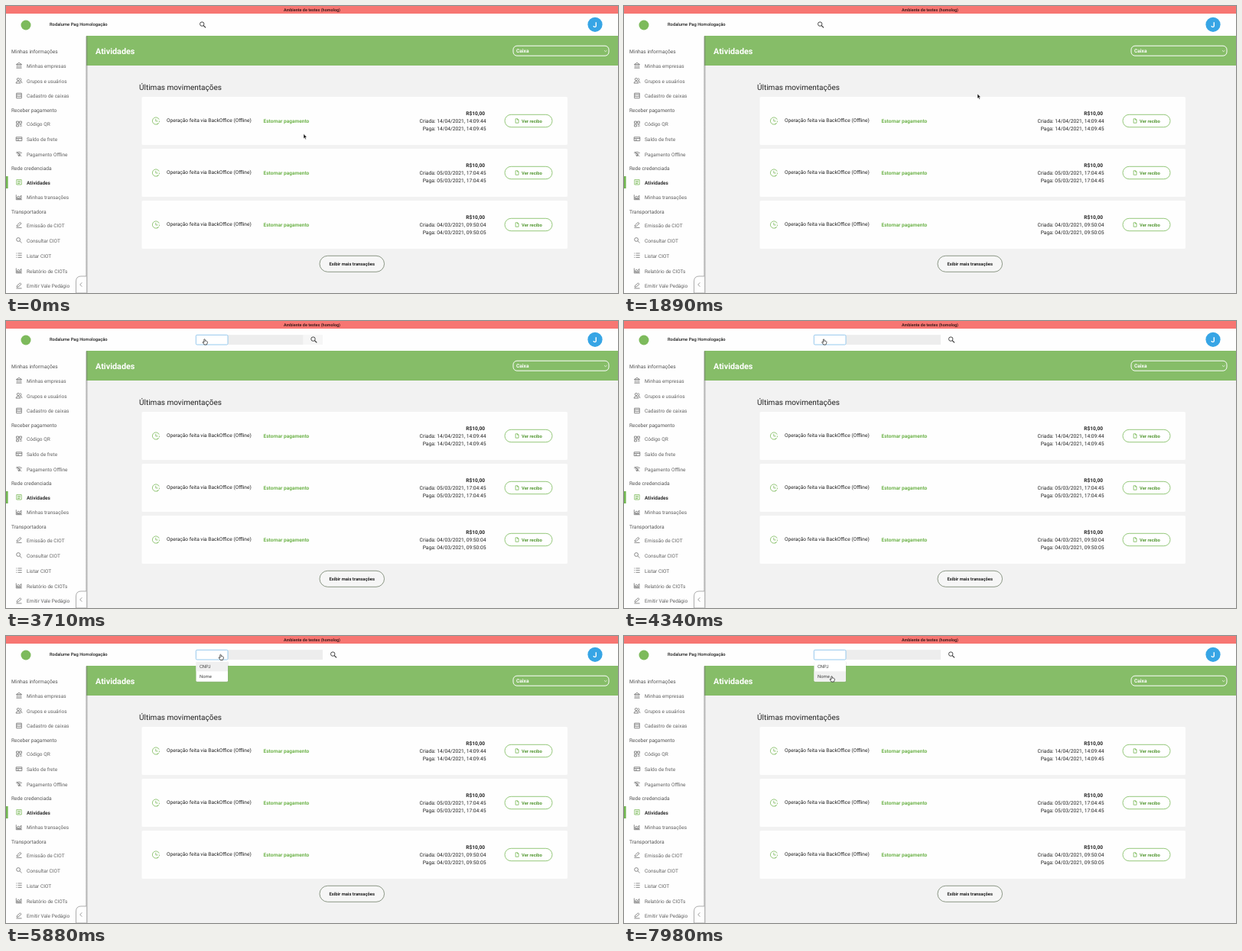
Animation of 800x376 px, one loop 8000 ms. Source, as an HTML page:

```html
<!DOCTYPE html>
<html lang="pt-BR">
<head>
<meta charset="utf-8">
<title>Atividades</title>
<style>
html, body { margin: 0; height: 100%; overflow: hidden; background: #f2f2f2; }
svg { display: block; width: 100vw; height: 100vh; }
text { font-family: Roboto, Arial, sans-serif; text-rendering: geometricPrecision; }
.icon { fill: none; stroke: #666; stroke-width: .75; }
.green { stroke: #70b44d; }
</style>
</head>
<body>
<svg id="stage" viewBox="0 0 800 376">
  <defs>
    <linearGradient id="shade">
      <stop stop-color="#777" stop-opacity=".7"/>
      <stop offset="1" stop-color="#777" stop-opacity="0"/>
    </linearGradient>
  </defs>
  <rect width="800" height="376" fill="#f2f2f2"/>
  <rect y="10" width="800" height="29.5" fill="#fefefe"/>
  <rect width="800" height="10" fill="#f77672"/>
  <rect x="105" y="39" width="695" height="39" fill="#86bd68"/>
  <rect y="39" width="105" height="337" fill="#fefefe"/>
  <rect x="104.5" y="39.5" width="3" height="337" fill="url(#shade)"/>
  <circle cx="26" cy="25" r="6.5" fill="#7dba5c"/>
  <circle cx="770" cy="24.3" r="9.6" fill="#37a5e5"/>
  <rect x="663" y="52.2" width="125" height="13" rx="5" fill="none" stroke="#fff"/>
  <path d="M782 58.2l1.7 1.5 1.7-1.5" fill="none" stroke="#fff" stroke-width=".7"/>
  <rect y="223" width="2.6" height="16" fill="#72b750"/>
  <g id="page"></g>
  <path d="M105 354H98Q91.5 354 91.5 361V376H105" fill="#fefefe" stroke="#999" stroke-width=".8"/>
  <path d="M99.3 362.3l-2.6 2.7 2.6 2.7" fill="none" stroke="#777" stroke-width=".7"/>
  <rect x="410" y="327.3" width="84.5" height="21" rx="10.5" fill="#f6f6f6" stroke="#71816a" stroke-width=".8"/>

  <g id="field">
    <rect id="track" x="248" y="18.3" height="12.7" fill="#f6f6f6"/>
    <rect id="bar" x="248" y="18.3" height="12.7" fill="#ededed"/>
    <rect id="select" x="248.3" y="18.3" height="12.7" rx="1.5" fill="#fff" stroke="#8cc5ee" stroke-width=".9"/>
  </g>
  <g id="lens" fill="none" stroke="#333">
    <circle cx="-.8" cy="-.9" r="2.7" stroke-width=".9"/>
    <path d="M1.2 1.1L4 3.9" stroke-width="1.2"/>
  </g>
  <g id="menu">
    <rect x="248.5" y="33.3" width="42" height="27.2" rx="1.5" fill="#999" opacity=".35"/>
    <rect x="248.5" y="32.8" width="41.5" height="27" rx="1.5" fill="#fff"/>
    <rect id="option" x="248.5" width="41.5" height="12.5" fill="#f0f0f0"/>
  </g>
  <g id="overlay"></g>
  <circle id="ring" fill="#dfe6f5" fill-opacity=".4" stroke="#7f99ca" stroke-width="1.4"/>
  <path id="arrow" d="M0 0V6.2L1.4 5 2.4 7.2 3.4 6.8 2.5 4.6H4.3Z" fill="#111" stroke="#fff" stroke-width=".5"/>
  <path id="hand" d="M-1.2-2.8Q-.4-3.8.2-2.8L.5-.8 1.6-.9 2.7-.5 3.4.2 3 2.5 2.3 4H-.8L-2.8 1Q-2.9.1-2 .3L-1 1Z" fill="#fff" stroke="#222" stroke-width=".75"/>
</svg>
<script>
const $ = id => document.getElementById(id);
const SVG = "http://www.w3.org/2000/svg";
const LOOP = 8000;

function add(tag, attrs, parent = $("page")) {
  const node = document.createElementNS(SVG, tag);
  for (const name in attrs) node.setAttribute(name, attrs[name]);
  return parent.appendChild(node);
}

// y is the middle of the capital letters
function label(string, x, y, size, { color = "#222", weight = 400, anchor = "start", parent } = {}) {
  add("text", {
    x, y: y + size * .355, "font-size": size, fill: color,
    "font-weight": weight, "text-anchor": anchor
  }, parent).textContent = string;
}

function icon(d, x, y, extra = "") {
  add("path", { d, transform: `translate(${x} ${y})`, class: "icon " + extra });
}

const shapes = {
  bank: "M-3.6-1.2L0-3.5 3.6-1.2ZM-3.6 3.4H3.6M-2.3-.6V2.6M0-.6V2.6M2.3-.6V2.6",
  users: "M-2.7-1.7a1.6 1.6 0 1 0 3.2 0a1.6 1.6 0 1 0-3.2 0M-4 3.3Q-3.8.8-1.1.8T1.8 3.3ZM1.3-3.2Q3.1-2.9 2.8-1.2T1.5.2Q3.8.7 3.9 3.3",
  till: "M-3.3-3.3H3.3V3.3H-3.3ZM-3.3-1.4H3.3M-3.3.8H-1Q0 2.2 1 .8H3.3",
  code: "M-3.4-3.4H-.6V-.6H-3.4ZM.7-3.4H3.4V-.6H.7ZM-3.4.7H-.6V3.4H-3.4ZM.7 1H3.4M1 2.9H2M3.1 2V3.5",
  cash: "M-3.8-2.4H3.8V2.4H-3.8ZM-3.8-.6H3.8M-2.3 1H0",
  offline: "M-3.8-1.4Q0-4.3 3.8-1.4M-2.4.2Q0-1.8 2.4.2M-1.2 1.6Q0 .7 1.2 1.6L0 3ZM-3-3.3L3 3.2",
  list: "M-3.2-3.2H3.2V3.2H-3.2ZM-1.8-1.3H1.8M-1.8.3H1.8M-1.8 1.8H1",
  chart: "M-3.7-3.2V3.2H3.8M-2.4 2V0L-.8-1.6.8 0 2.9-2.3V2ZM-1 0V2M1 0V2",
  pencil: "M-3.6 3.4H3.6M-3 1.7L-2.5-.1 1.5-3.6 3-2 -1.1 1.5Z",
  search: "M-3.3-.8a2.4 2.4 0 1 0 4.8 0a2.4 2.4 0 1 0-4.8 0M1 1L3.6 3.5",
  rows: "M-3.7-2.7h1M-1.5-2.7H3.7M-3.7 0h1M-1.5 0H3.7M-3.7 2.7h1M-1.5 2.7H3.7",
  clock: "M4.2-1.8A4.6 4.6 0 1 0 3.4 3.1M4.4 0V1.8M-.2-2.6V.4H2.5M1.5 4.3L3.5 3.1",
  page: "M-1.9-2.7H.7L2-1.4V2.7H-1.9ZM.6-2.7V-1.3H2"
};

const sections = [
  ["Minhas informações", 60, [["Minhas empresas", 78.3, "bank"], ["Grupos e usuários", 98.3, "users"], ["Cadastro de caixas", 118, "till"]]],
  ["Receber pagamento", 136.5, [["Código QR", 155, "code"], ["Saldo de frete", 174.7, "cash"], ["Pagamento Offline", 194.5, "offline"]]],
  ["Rede credenciada", 212.8, [["Atividades", 231.3, "list"], ["Minhas transações", 251, "chart"]]],
  ["Transportadora", 269.3, [["Emissão de CIOT", 287.5, "pencil"], ["Consultar CIOT", 307.3, "search"], ["Listar CIOT", 327.2, "rows"], ["Relatório de CIOTs", 347.2, "chart"], ["Emitir Vale Pedágio", 367, "pencil"]]]
];
for (const [heading, y, items] of sections) {
  label(heading, 7, y, 6.65, { color: "#555" });
  for (const [name, itemY, shape] of items) {
    const active = name === "Atividades";
    icon(shapes[shape], 17, itemY - .5, active ? "green" : "");
    label(name, 27, itemY, 6.5, { color: active ? "#333" : "#626262", weight: active ? 700 : 400 });
  }
}

label("Ambiente de testes (homolog)", 400, 5, 5.45, { weight: 700, anchor: "middle", color: "#401d1c" });
label("Rodalume Pag Homologação", 57, 24.3, 5.8, { weight: 500 });
label("J", 770, 24.5, 9.5, { weight: 700, anchor: "middle", color: "#fff" });
label("Atividades", 117, 58.7, 10.8, { weight: 700, color: "#fff" });
label("Caixa", 667, 58.7, 6.6, { weight: 700, color: "#fff" });
label("Últimas movimentações", 174, 106.5, 10);

const receipts = [
  ["14/04/2021, 14:09:44", "14/04/2021, 14:09:45"],
  ["05/03/2021, 17:04:45", "05/03/2021, 17:04:45"],
  ["04/03/2021, 09:50:04", "04/03/2021, 09:50:05"]
];
receipts.forEach(([created, paid], i) => {
  const y = 119 + i * 68;
  add("rect", { x: 177.5, y, width: 556.5, height: 63, rx: 1.5, fill: "#fefefe" });
  icon(shapes.clock, 196, y + 31.5, "green");
  label("Operação feita via BackOffice (Offline)", 210, y + 30.3, 6.57);
  label("Estornar pagamento", 336.5, y + 31.8, 6.57, { weight: 700, color: "#70b44d" });
  label("R$10,00", 626, y + 21.8, 6.6, { weight: 700, anchor: "end" });
  label("Criada: " + created, 627.5, y + 32, 6.7, { anchor: "end" });
  label("Paga: " + paid, 627.5, y + 42, 6.7, { anchor: "end" });
  add("rect", { x: 652, y: y + 23.3, width: 62, height: 16.4, rx: 8.2, fill: "#fff", stroke: "#79b958", "stroke-width": .8 });
  icon(shapes.page, 668, y + 31.5, "green");
  label("Ver recibo", 674, y + 31.7, 5.85, { weight: 700, color: "#599b39" });
});
label("Exibir mais transações", 452.2, 338, 5.85, { weight: 700, anchor: "middle", parent: $("overlay") });
label("CNPJ", 253, 40, 5.9, { color: "#444", parent: $("menu") });
label("Nome", 253, 53, 5.9, { color: "#444", parent: $("menu") });

const clamp = v => Math.max(0, Math.min(1, v));
const smooth = v => v * v * (3 - 2 * v);

// time, x, y of the pointer
const path = [
  [0, 389, 167.5], [700, 389, 167.5], [1890, 462, 115], [2700, 256, 24.5],
  [3400, 256, 24.5], [3710, 260, 27], [4250, 260, 27], [4800, 281, 27.5],
  [6300, 281, 27.5], [6860, 282, 28], [7100, 282, 28], [7700, 272, 56], [LOOP, 272, 56]
];
const clicks = [[2800, 255, 22], [5040, 281, 25]];
const HAND_AT = 2650, OPEN_AT = 3430, MENU_AT = 5390;

function pointer(t) {
  const i = path.findIndex((p, k) => k && t <= p[0]);
  const [t0, x0, y0] = path[i - 1], [t1, x1, y1] = path[i];
  const p = smooth((t - t0) / (t1 - t0));
  return [x0 + (x1 - x0) * p, y0 + (y1 - y0) * p];
}

const show = (id, visible) => $(id).style.display = visible ? "" : "none";
const set = (id, name, value) => $(id).setAttribute(name, value);

function draw(t) {
  const [x, y] = pointer(t);
  const isHand = t > HAND_AT;
  show("arrow", !isHand);
  show("hand", isHand);
  set(isHand ? "hand" : "arrow", "transform", `translate(${x} ${y})`);

  const opened = 1 - (1 - clamp((t - OPEN_AT) / 600)) ** 3;
  const lensX = 257 + 171 * opened;
  const barWidth = Math.max(0, lensX - 14 - 248);
  show("field", opened > 0);
  set("lens", "transform", `translate(${lensX} 24.5)`);
  set("bar", "width", barWidth);
  set("track", "width", Math.min(166, lensX + 17 - 248));
  set("select", "width", Math.min(41.7, barWidth));

  show("menu", t >= MENU_AT);
  set("option", "y", y > 46 ? 46.3 : 33.8);

  const click = clicks.find(([start]) => t >= start && t < start + 300);
  show("ring", click);
  if (click) {
    const age = (t - click[0]) / 300;
    set("ring", "cx", click[1]);
    set("ring", "cy", click[2]);
    set("ring", "r", 9 - age * 1.5);
    set("ring", "opacity", 1 - age);
  }
}

const start = performance.now();
function tick() {
  draw((performance.now() - start) % LOOP);
  requestAnimationFrame(tick);
}
tick();
</script>
</body>
</html>
```
